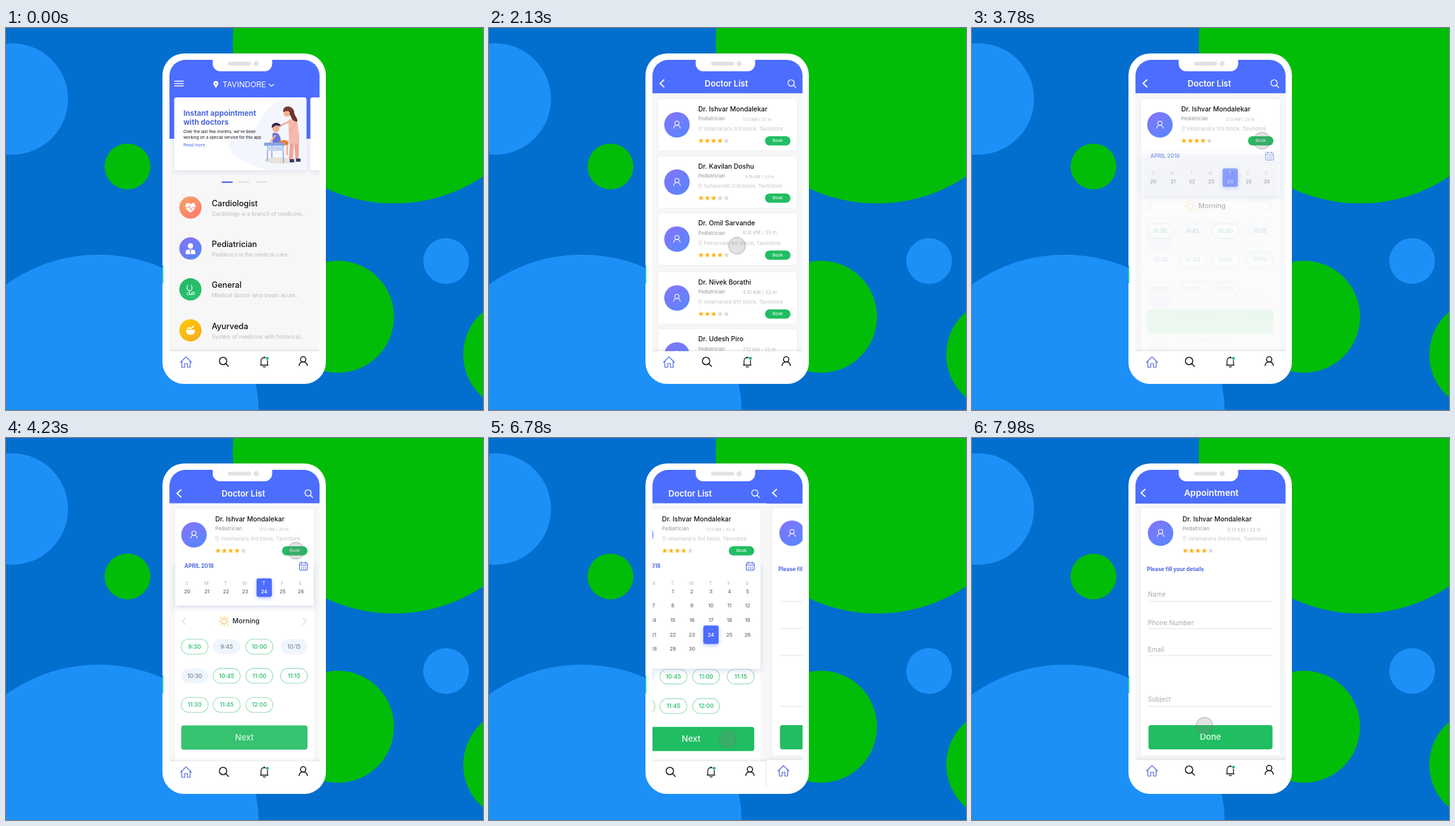
An HTML page with a canvas that plays this animation: 750x600 px, repeating every 8 s.

```html
<!DOCTYPE html>
<html lang="en">
<head>
<meta charset="utf-8">
<title>Doctor booking app</title>
<style>
  html, body { margin: 0; width: 100%; height: 100%; overflow: hidden; background: #026ecd; }
  canvas { display: block; }
</style>
</head>
<body>
<canvas id="stage" width="750" height="600"></canvas>
<script>
const ctx = document.getElementById('stage').getContext('2d');
const LOOP = 8000, SLIDE = 237;
const BLUE = '#4d6dff', INK_BLUE = '#4a66df', GREEN = '#21bd62', GREY = '#bcbcbc';
const CITY = 'Tavindore';

const doctors = [
  { name: 'Ishvar Mondalekar', km: '5.13', kmX: 399, kmY: 17, kmSize: 6.5, place: 'Velamanjira 3rd', stars: 4, y: 127.5 },
  { name: 'Kavilan Doshu', km: '8.16', kmX: 403, kmY: 17, kmSize: 6.5, place: 'Sohanivalli 2nd', stars: 3, y: 217.5 },
  { name: 'Omil Sarvande', km: '6.18', kmX: 399, kmY: 14.5, kmSize: 7.6, place: 'Pemurvadi 6th', stars: 4, y: 307 },
  { name: 'Nivek Borathi', km: '4.10', kmX: 399, kmY: 16.5, kmSize: 7.6, place: 'Velamanjira 9th', stars: 3, y: 399.5 },
  { name: 'Udesh Piro', km: '7.13', kmX: 399, kmY: 17, kmSize: 7.6, place: 'Sohanivalli 4th', stars: 4, y: 489 }
];
const specialities = [
  ['Cardiologist', 'Cardiology is a branch of medicine..', '#f4a261', '#ff7d6e'],
  ['Pediatrician', 'Pediatrics is the medical care..', '#8670f7', '#5a86f7'],
  ['General', 'Medical doctor who treats acute..', '#1fb862', '#2dc173'],
  ['Ayurveda', 'System of medicine with historical..', '#ffcb05', '#f9ac1c']
];

// Timing
const linear = (t, a, b) => Math.min(1, Math.max(0, (t - a) / (b - a)));
const ease = (t, a, b) => (1 - Math.cos(Math.PI * linear(t, a, b))) / 2;
const easeOut = (t, a, b) => 1 - (1 - linear(t, a, b)) ** 3;
const mix = (a, b, p) => a + (b - a) * p;

// Drawing helpers
function text(str, x, y, size, color = '#111', weight = 400, align = 'left') {
  ctx.font = `${weight} ${size}px Inter, sans-serif`;
  ctx.textAlign = align;
  ctx.textBaseline = 'middle';
  ctx.fillStyle = color;
  ctx.fillText(str, x, y);
}
function paint(fill, stroke, width) {
  if (fill) { ctx.fillStyle = fill; ctx.fill(); }
  if (stroke) { ctx.strokeStyle = stroke; ctx.lineWidth = width; ctx.stroke(); }
}
function circle(x, y, r, fill, stroke, width = 1) {
  ctx.beginPath();
  ctx.arc(x, y, r, 0, 7);
  paint(fill, stroke, width);
}
function box(x, y, w, h, r, fill, stroke, width = 1) {
  ctx.beginPath();
  ctx.roundRect(x, y, w, h, r);
  paint(fill, stroke, width);
}
function path(d, fill, stroke, width = 1) {
  const p = new Path2D(d);
  if (fill) { ctx.fillStyle = fill; ctx.fill(p); }
  if (stroke) { ctx.strokeStyle = stroke; ctx.lineWidth = width; ctx.stroke(p); }
}
function layer(alpha, draw, dx = 0, dy = 0) {
  if (alpha <= 0) return;
  ctx.save();
  ctx.globalAlpha *= Math.min(1, alpha);
  ctx.translate(dx, dy);
  draw();
  ctx.restore();
}
function shadowed(color, blur, dy, draw) {
  ctx.save();
  ctx.shadowColor = color;
  ctx.shadowBlur = blur;
  ctx.shadowOffsetY = dy;
  draw();
  ctx.restore();
}
function disc(x, y, r, from, to) {
  const g = ctx.createLinearGradient(x - r, y - r, x + r * .5, y + r);
  g.addColorStop(0, from);
  g.addColorStop(1, to);
  circle(x, y, r, g);
}

// Icons
function user(x, y, s, color, width) {
  circle(x, y - 2.3 * s, 3.2 * s, null, color, width);
  ctx.beginPath();
  ctx.arc(x, y + 5.5 * s, 5 * s, Math.PI, 0);
  paint(null, color, width);
}
function search(x, y, r, color, width) {
  circle(x, y, r, null, color, width);
  path(`M${x + r * .7} ${y + r * .7}l${r * .85} ${r * .85}`, null, color, width);
}
function pin(x, y, s, color, solid) {
  layer(1, () => {
    ctx.scale(s, s);
    path('M0 5.5C-2 2.5-4-.2-4-2A4 4 0 0 1 4-2C4-.2 2 2.5 0 5.5Z', solid && color, !solid && color, 1);
    circle(0, -1.8, 1.5, solid ? BLUE : null, color, .6);
  }, x, y);
}
function star(x, y, color) {
  ctx.beginPath();
  for (let i = 0; i < 10; i++) {
    const r = i % 2 ? 1.9 : 4.5, a = i * Math.PI / 5;
    ctx.lineTo(x + r * Math.sin(a), y - r * Math.cos(a));
  }
  ctx.closePath();
  paint(color);
}
function back(x, y) {
  path(`M${x + 3.5} ${y - 6}l-6.5 6 6.5 6`, null, '#fff', 1.9);
}

function backdrop() {
  ctx.fillStyle = '#026ecd';
  ctx.fillRect(0, 0, 750, 600);
  const green = '#02bd08', sky = '#1d90f8';
  circle(610, 22, 253.5, green);
  circle(10, 111.5, 87.5, sky);
  circle(191, 217.5, 36, green);
  circle(146, 607.5, 251.5, sky);
  circle(522, 453.5, 88, green);
  circle(692, 366, 36, sky);
  circle(807, 513, 88, green);
}

// Shared parts
function screenBase(headerBottom) {
  ctx.fillStyle = '#f7f7f7';
  ctx.fillRect(257, 50, SLIDE, 500);
  ctx.fillStyle = BLUE;
  ctx.fillRect(257, 40, SLIDE, headerBottom - 40);
}

function nav(dy) {
  layer(1, () => {
    shadowed('rgba(0,0,0,.16)', 4, -1, () => box(257, 507.5, SLIDE, 60, 0, '#fff'));
    path('M274 525.5L283 516.5l9 9M276.5 523.5V533H281v-6h4.2v6h4.3v-9.5', null, INK_BLUE, 1.2);
    search(341.3, 523, 5.8, '#111', 1.5);
    path('M399.5 529.5h13M401 529v-6c0-7 10-7 10.2 0v6M404 531.3c.8 1.8 3.5 1.8 4.3 0M406.2 517.5v-1.5', null, '#111', 1.3);
    circle(411, 518.8, 2.6, '#25b96b', '#fff', .7);
    user(467.3, 523.5, 1.3, '#111', 1.5);
  }, 0, dy);
}

function doctorInfo(d, x = 0, avatarDx = 0, avatarDy = 0, kmSize = d.kmSize) {
  const y = d.y, ax = 295.5 + avatarDx, ay = y + 24.5 + avatarDy;
  disc(ax, ay, 20, '#8574fb', '#5a85fc');
  user(ax, ay, 1.05, '#fff', 1.1);
  text('Dr. ' + d.name, 329 + x, y, 10.4, '#111', 500);
  text('Pediatrician', 329 + x, y + 15.7, 7.5, '#a2a2aa', 500);
  text(d.km + ' KM / 33 m', d.kmX + x * 1.3, y + d.kmY, kmSize, GREY);
  pin(332 + x, y + 31, .65, '#c4c4c4');
  text(`${d.place} block, ${CITY}`, 337.5 + x, y + 31.2, 8.1, '#c6c6c6');
  for (let i = 0; i < 5; i++) star(333.3 + x + i * 10, y + 49.7, i < d.stars ? '#fcb316' : '#d6d6da');
}
function doctorCard(d) {
  shadowed('rgba(0,0,0,.05)', 4, 0, () => box(266, d.y - 16, 218, 81, 3, '#fff'));
  doctorInfo(d);
  box(434, d.y + 42.5, 40, 14.5, 7.2, GREEN);
  text('Book', 454, d.y + 49.8, 6.6, '#e9fff1', 500, 'center');
}
function actionButton(label, x, y, w) {
  box(x, y, w, 38, 4, GREEN);
  text(label, x + w / 2, y + 19.3, 13.2, '#e6fbee', 500, 'center');
}

// Home
function illustration() {
  ctx.beginPath();
  ctx.ellipse(435, 208, 29, 5, 0, 0, 7);
  paint('#e9e2da');
  path('M447 165h14l-1 41h-5l-2-28-2 28h-6z', '#f0a49a');
  path('M444 145c7-5 13-2 15 6l2 30-16 1z', '#f6b9ad');
  path('M445 147l-17 8M456 149l-10 14', null, '#f3ae9f', 3);
  path('M436 132c-2-11 14-12 17-1 0 8 6 9 5 16-7 0-9-5-11-10z', '#6b3429');
  circle(441.5, 134.5, 4.8, '#f2b18e');
  path('M436 131c1-9 13-9 14-1z', '#7a392c');
  path('M446 206h7v5h-7zM456 205h7v5h-7z', '#39406f');
  path('M419 166c5-4 13 0 13 11l-1 6h-12z', '#6a74d8');
  path('M429 179c6-5 13-3 15 0v5h-14z', '#ef7e2e');
  path('M442 183v17M424 168l-9 12', null, '#f2b18e', 2.5);
  circle(424.5, 158, 5.6, '#f2b18e');
  path('M418 157c-2-10 13-10 14-3l-8-1z', '#33294a');
  path('M411 184v25M436 184v28M418 184v20', null, '#9db4e2', 2);
  path('M406 180h32v5h-32z', '#86a5e6');
  path('M410 186h27v7h-27z', '#c5d3f2');
}

function specialityIcon(i, x, y) {
  layer(1, () => {
    if (i === 0) {
      path('M0 8C-6 4-8.5 0-8-3c.8-5 6-5.5 8-1.5C2-8.5 7.2-8 8-3 8.5 0 6 4 0 8Z', '#fff');
      path('M-8 0h5l1.5-3L1 4l2-4h5', null, '#fa806b', 1);
    } else if (i === 1) {
      circle(0, -4, 4.2, '#fff');
      path('M-7.5 9V5c0-5 15-5 15 0v4z', '#fff');
      path('M0 2.5v6M-2 1.5l2 3 2-3', null, '#6f7cf7', 1);
    } else if (i === 2) {
      path('M-4.5-7c-2 7 0 9 3 9s5-2 3-9M-1.5 2v4c0 3 4 3 4 0', null, '#dffbea', 1.2);
      circle(-3.5, 7, 1.8, null, '#dffbea', 1);
      circle(4, 6, 2, null, '#dffbea', 1.2);
    } else {
      path('M-7-1H7c0 5-2 8-7 8s-7-3-7-8z', '#fff');
      path('M0-2l5-5M-5-2c1-3 4-3 5 0', null, '#fff', 2);
    }
  }, x, y);
}

function homeBody() {
  shadowed('rgba(60,80,150,.12)', 6, 3, () => {
    box(264.5, 109, 208, 114.5, 4, '#fff');
    box(478.5, 109, 60, 114.5, 4, '#fff');
  });
  path('M472 110v113h-62C375 212 345 198 351 178c6-14 30-4 42-22 12-20 20-45 60-46z', '#f4f6fe');
  illustration();
  text('Instant appointment', 279, 134.3, 11.6, INK_BLUE, 700);
  text('with doctors', 279, 148.5, 11.6, INK_BLUE, 700);
  text('Over the last few months, we’ve been', 279, 163.5, 6.4);
  text('working on a special service for this app', 279, 172.5, 6.4);
  text('Read more', 279, 184.3, 6.7, INK_BLUE);
  [339, 365, 393].forEach((x, i) => box(x, 241, 17.5, 2.3, 1, i ? '#e1e1e1' : '#4a66e6'));
  specialities.forEach(([title, note, from, to], i) => {
    const y = 282 + i * 64.3;
    disc(290, y, 17.5, from, to);
    specialityIcon(i, 290, y);
    text(title, 323.5, y - 6, 12.6, '#111', 500);
    text(note, 323.5, y + 10.2, 8.6, GREY);
  });
}
function homeHeader() {
  [83.5, 87.3, 91].forEach(y => path(`M264.5 ${y}h15`, null, '#fff', 1.3));
  pin(330, 89, .95, '#fff', true);
  text(CITY.toUpperCase(), 340.5, 89.7, 12.1, '#fff');
  path('M413.5 88l4 3.5 4-3.5', null, '#fff', 1.2);
}

// Booking
function calendar(open) {
  const bottom = mix(263, 362.5, open), cols = [285, 316, 346, 376, 406, 435, 463.5];
  const weekY = mix(241.5, 309.5, open);
  shadowed('rgba(90,120,190,.25)', 8, 3, () => box(266, 195, 218, bottom - 195, 2, '#fff'));
  ctx.fillStyle = '#fff';
  ctx.fillRect(266, 186, 218, 12);
  text('APRIL 2018', 280.5, 201.8, 8.4, INK_BLUE, 700);
  box(461.5, 196, 12.5, 11.5, 2, null, INK_BLUE, 1.1);
  path('M461.5 199.5h12.5M464.5 194v3.5M471 194v3.5', null, INK_BLUE, 1.1);
  ctx.fillStyle = INK_BLUE;
  for (let i = 0; i < 6; i++) ctx.fillRect(464 + i % 3 * 3, 202 + (i > 2 ? 2.5 : 0), 1.6, 1.3);

  ctx.save();
  ctx.beginPath();
  ctx.rect(266, 195, 218, bottom - 195);
  ctx.clip();
  shadowed('rgba(70,100,255,.4)', 6, 2, () => box(394, mix(220.5, 294.5, open), 24, 29, 3, BLUE));
  [...'SMTWTFS'].forEach((letter, i) => {
    const put = color => text(letter, cols[i] - .7, 228.7, 7.6, color, 400, 'center');
    if (i !== 4) put('#b5b5b5');
    else {
      layer(1 - open * 3, () => put('#fff'));
      layer(open * 3 - 1, () => put('#b5b5b5'));
    }
  });
  for (let day = 1; day <= 30; day++) {
    const row = Math.floor((day + 1) / 7), x = cols[(day + 1) % 7];
    const y = row === 3 ? weekY : 241.5 + row * 22.6;
    layer(row === 3 ? 1 : open ** 1.5, () => text(day, x, y, 7.7, day === 24 ? '#fff' : '#77777d', 600, 'center'));
  }
  ctx.restore();
}

function slot(label, x, y, free) {
  if (free) box(x - 21.2, y - 11.7, 42.4, 23.4, 11.7, '#fff', '#93dcb4', 1.1);
  else box(x - 21.2, y - 11.7, 42.4, 23.4, 11.7, '#eff5fc');
  text(label, x, y + .3, 8.9, free ? '#35c271' : '#78849b', free ? 600 : 500, 'center');
}

function bookingBody(t) {
  const shown = ease(t, 3360, 4140), open = ease(t, 5250, 5730);
  layer(shown, () => {
    ctx.fillStyle = '#fff';
    ctx.fillRect(266, 190, 218, 320);
  });
  const drop = (i, draw) => {
    const p = ease(t, 3480 + i * 50, 4290 + i * 50);
    layer(p * 1.12, draw, 0, -12 * (1 - p));
  };
  drop(0, () => {
    path('M282.5 282.5l-5.5 5.5 5.5 5.5M466.5 282.5l5.5 5.5-5.5 5.5', null, '#c4c4c4', 1);
    circle(343, 288, 4.2, null, '#f9b73c', 1.1);
    for (let a = 0; a < 8; a++) {
      const c = Math.cos(a * Math.PI / 4), s = Math.sin(a * Math.PI / 4);
      path(`M${343 + 6 * c} ${288 + 6 * s}L${343 + 8.3 * c} ${288 + 8.3 * s}`, null, '#f9b73c', 1.1);
    }
    text('Morning', 356, 288.3, 10.7, '#222', 500);
  });
  const xs = [296.6, 347, 398.4, 452.8], busy = [1, 3, 4];
  for (let row = 0; row < 3; row++) drop(row + 1, () => {
    for (let col = 0; col < (row < 2 ? 4 : 3); col++) {
      const i = row * 4 + col, minutes = 570 + i * 15;
      const label = Math.floor(minutes / 60) + ':' + String(minutes % 60).padStart(2, '0');
      slot(label, xs[col], 328.3 + row * 46.4, !busy.includes(i));
    }
  });
  drop(3.5, () => actionButton('Next', 275.5, 453.8, 198.5));
  layer(shown, () => calendar(open));
}

// Screens
function mainScreen(t) {
  const toList = ease(t, 1230, 2010);
  screenBase(mix(174, 102.5, easeOut(t, 1230, 1830)));
  layer(1 - ease(t, 1230, 1600), homeBody);
  layer(1 - toList, homeHeader, 0, -28 * toList);
  layer(toList, () => {
    back(272, 87);
    text('Doctor List', 373.2, 87.8, 13, '#fff', 600, 'center');
    search(475, 86.3, 4.9, '#fff', 1.4);
  }, 0, 22 * (1 - toList));

  doctors.forEach((d, i) => {
    const p = ease(t, 1400 + i * 80, 1800 + i * 80);
    const gone = i ? ease(t, 3360, 3860) : 0;
    layer(p ** 1.5 * (1 - gone), () => doctorCard(d), 0, 14 * (1 - p));
  });
  if (t > 3360) bookingBody(t);
  nav(0);
}

function formScreen(t) {
  screenBase(103);
  back(269, 86.3);
  text('Appointment', 376.3, 87.3, 13.7, '#fff', 600, 'center');
  shadowed('rgba(0,0,0,.06)', 4, 0, () => box(265.5, 110, 219, 389, 3, '#fff'));
  doctorInfo(doctors[0], 2, 1, -2.5, 7.6);
  text('Please fill your details', 275, 206.3, 8.4, INK_BLUE, 700);
  const labels = ease(t, 7350, 7770);
  [['Name', 246, 256.5], ['Phone Number', 291, 299.5], ['Email', 333.3, 341.7], ['Subject', 411, 421.5]]
    .forEach(([label, y, line]) => {
      layer(labels, () => text(label, 276.5, y, 10.2, '#a9a9a9'));
      path(`M277 ${line}H472`, null, '#e4e4e4', 1);
    });
  actionButton('Done', 277.5, 451, 195);
  nav(-2);
}

function pointer(t) {
  const moves = [
    [780, 1050, 506, 404, 390, 342],
    [2550, 2910, 390, 342, 456, 177],
    [4770, 4950, 456, 177, 455.5, 235.5],
    [5940, 6180, 455.5, 235.5, 375, 473],
    [7950, 8010, 375, 473, 357, 433]
  ];
  const current = moves.filter(m => t >= m[0]).pop();
  if (!current) return;
  const [start, end, x0, y0, x1, y1] = current;
  const p = ease(t, start, end);
  circle(mix(x0, x1, p), mix(y0, y1, p), 13.2, 'rgba(128,128,128,.23)', 'rgba(115,115,115,.5)', 1);
}

function render(t) {
  backdrop();
  box(246, 40, 257, 519, 34, '#fff');
  ctx.fillStyle = '#35e58a';
  ctx.fillRect(246, 373, 1.5, 28);

  ctx.save();
  ctx.beginPath();
  ctx.roundRect(257, 50, 236, 498, [25, 25, 10, 10]);
  ctx.clip();
  const offset = Math.round(SLIDE * ease(t, 6520, 7320));
  if (offset < SLIDE) layer(1, () => mainScreen(t), -offset);
  if (offset > 0) layer(1, () => formScreen(t), SLIDE - offset);
  pointer(t);
  ctx.restore();

  box(325, 44, 93.5, 24, [0, 0, 12, 12], '#fff');
  box(349, 53, 36.5, 6, 3, '#e2e2e2');
  circle(393.3, 56, 4, '#e2e2e2');
}

function frame(now) {
  render(now % LOOP);
  requestAnimationFrame(frame);
}
frame(performance.now());
</script>
</body>
</html>
```
